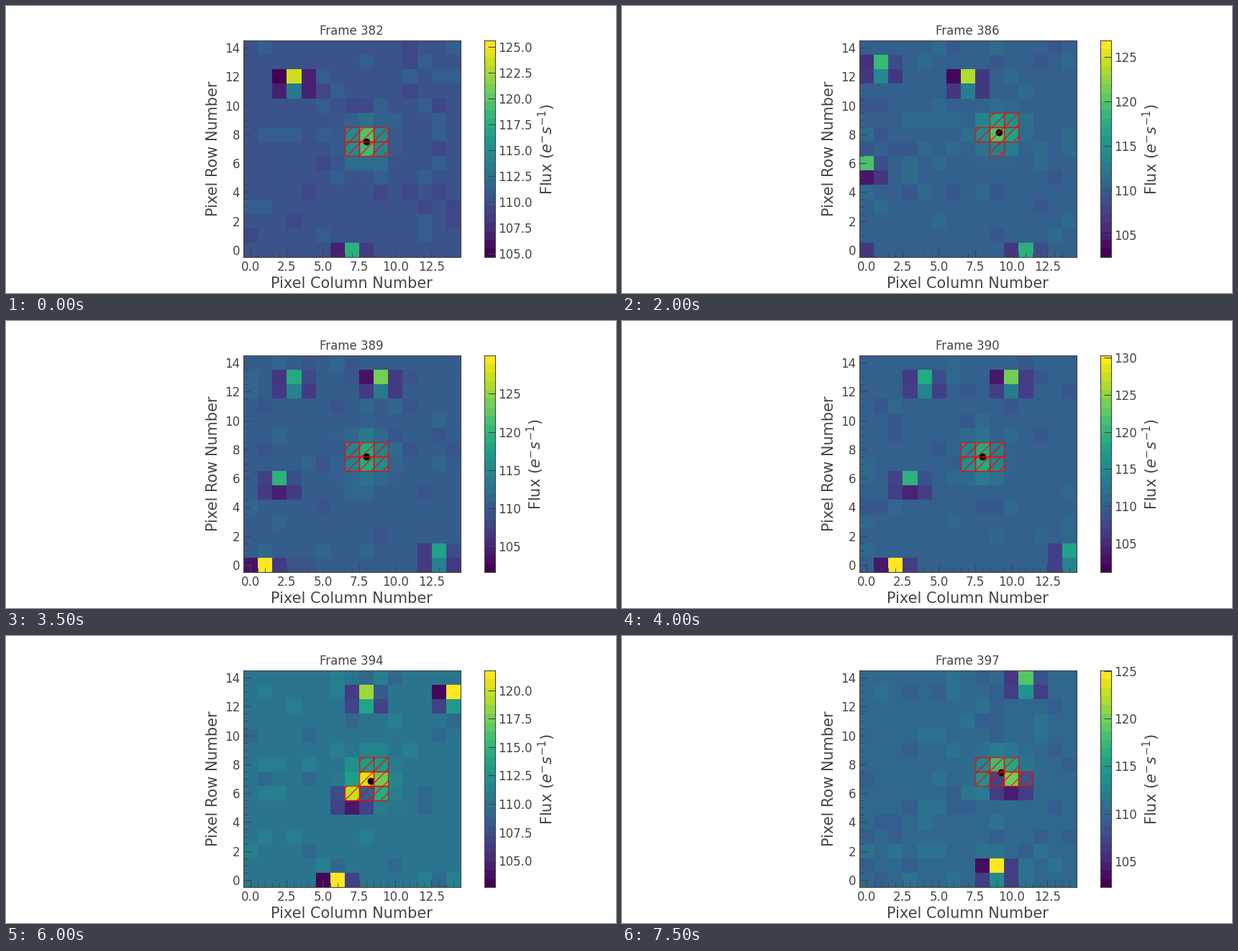
These frames come from a looping animation (848x400 px, 8 s). A matplotlib script:

```python
import numpy as np
import matplotlib.pyplot as plt
from matplotlib.animation import FuncAnimation
from matplotlib.patches import Rectangle
from matplotlib.ticker import AutoMinorLocator, MultipleLocator

W, H = 848, 400
N = 15           # detector pixels per side
BANDS = 25       # colour bar steps
COUNT = 16
FIRST = 382
SKY = 110        # background flux
DRIFT = 0.92     # columns per step
INK = "#444444"

plt.rcParams.update({
    "font.family": "DejaVu Sans", "font.size": 12, "axes.labelsize": 15,
    "axes.titlesize": 12, "text.color": INK, "axes.labelcolor": INK,
    "axes.edgecolor": INK, "xtick.color": INK, "ytick.color": INK,
    "xtick.direction": "in", "ytick.direction": "in",
    "xtick.major.size": 7, "ytick.major.size": 7,
    "xtick.minor.size": 4, "ytick.minor.size": 4,
    "hatch.linewidth": 1.0,
})

# Aperture shapes: row -> first and last column
BLOCK = {8: (7, 9), 7: (7, 9)}
TALL = {9: (9, 9), 8: (8, 9), 7: (8, 9), 6: (8, 9)}
CROSS = {9: (9, 10), 8: (8, 10), 7: (9, 9)}
STEP = {8: (8, 9), 7: (7, 9), 6: (9, 9)}
FOOT = {8: (8, 9), 7: (8, 9), 6: (7, 9)}
WIDE = {8: (8, 10), 7: (8, 11)}

# Step, lowest flux, highest flux, aperture
KEYS = [(0, 104.62, 125.63, BLOCK), (1, 104.0, 128.0, TALL),
        (2, 102.0, 121.8, TALL), (5, 102.8, 129.4, CROSS),
        (8, 101.1, 130.3, BLOCK), (10, 103.1, 133.4, STEP),
        (12, 102.66, 121.77, FOOT), (14, 102.4, 124.9, WIDE),
        (15, 102.3, 125.05, WIDE)]
TIMES, LOWS, HIGHS, SHAPES = zip(*KEYS)

# Start column, start row, rows per step, then flux at peak, left, below
SOURCES = [(3.0, 12.1, 0.10, 14, -7, 3), (-3.05, 12.55, 0.07, 9, -4, 4),
           (7.0, 0.0, 0.08, 8, -3.5, 4), (-5.0, -0.3, 0.06, 25, -7, 3),
           (-4.0, 5.6, 0.07, 10, -3, -6)]


def aperture(t):
    shape = SHAPES[np.argmin(np.abs(np.subtract(TIMES, t)))]
    return [(c, r) for r, (a, b) in shape.items() for c in range(a, b + 1)]


def flux(t, star):
    """Sparse noise, one fixed star and sources drifting to the right."""
    rng = np.random.default_rng(40 + t)
    grid = SKY + 0.9 * np.round(0.4 * rng.standard_normal((N, N)))
    rows, cols = np.mgrid[:N, :N]
    dist2 = (cols - star[0]) ** 2 + (rows - star[1]) ** 2
    grid += 10.7 * np.exp(-dist2 / 1.44)

    for x, y, rise, peak, left, below in SOURCES:
        c, r = round(x + DRIFT * t), round(y + rise * t)
        stamp = {(0, 0): peak, (-1, 0): left, (1, 0): left / 2,
                 (0, -1): below, (-1, -1): -3.5, (1, -1): -3.5}
        for (dc, dr), change in stamp.items():
            if 0 <= c + dc < N and 0 <= r + dr < N:
                grid[r + dr, c + dc] = SKY + change
    return grid


def box(x, top, w, h):
    return [x / W, 1 - (top + h) / H, w / W, h / H]


fig = plt.figure(figsize=(W / 100, H / 100), dpi=100, facecolor="white")
ax = fig.add_axes(box(329.76, 48, 302, 302))
cax = fig.add_axes(box(664.64, 48, 15.1, 302))

image = ax.imshow(np.zeros((N, N)), cmap="viridis", origin="lower",
                  interpolation="nearest", aspect="auto")
ax.set_xlabel("Pixel Column Number", labelpad=3)
ax.set_ylabel("Pixel Row Number")
ax.xaxis.set_major_locator(MultipleLocator(2.5))
ax.yaxis.set_major_locator(MultipleLocator(2))
ax.xaxis.set_minor_locator(AutoMinorLocator(5))
ax.yaxis.set_minor_locator(AutoMinorLocator(4))
title = ax.set_title("")
dot, = ax.plot([], [], "o", color="black", ms=6, zorder=1.5)

cax.imshow(np.arange(BANDS)[:, None], cmap="viridis", origin="lower",
           extent=(0, 1, 0, 1), aspect="auto", interpolation="nearest")
cax.set_xticks([])
cax.yaxis.tick_right()
cax.yaxis.set_label_position("right")
cax.set_ylabel("Flux ($e^{-}s^{-1}$)")

squares = []


def update(t):
    cells = aperture(t)
    star = np.mean(cells, axis=0)
    lo, hi = np.interp(t, TIMES, LOWS), np.interp(t, TIMES, HIGHS)

    title.set_text(f"Frame {FIRST + t}")
    image.set_data(flux(t, star))
    image.set_clim(lo, hi)
    dot.set_data([star[0]], [star[1]])

    while squares:
        squares.pop().remove()
    for c, r in cells:
        squares.append(ax.add_patch(Rectangle(
            (c - 0.5, r - 0.5), 1, 1, fill=False, hatch="//", color="red",
            alpha=0.8, lw=1, zorder=2)))

    step, digits = (2.5, 1) if hi - lo < 22.3 else (5, 0)
    ticks = np.arange(np.ceil(lo / step) * step, hi, step)
    cax.set_yticks((ticks - lo) / (hi - lo), [f"{v:.{digits}f}" for v in ticks])
    cax.set_ylim(0, 1)
    return []


anim = FuncAnimation(fig, update, frames=COUNT, interval=500,
                     init_func=lambda: update(0), repeat=True, repeat_delay=0,
                     blit=False)
plt.show()
```
